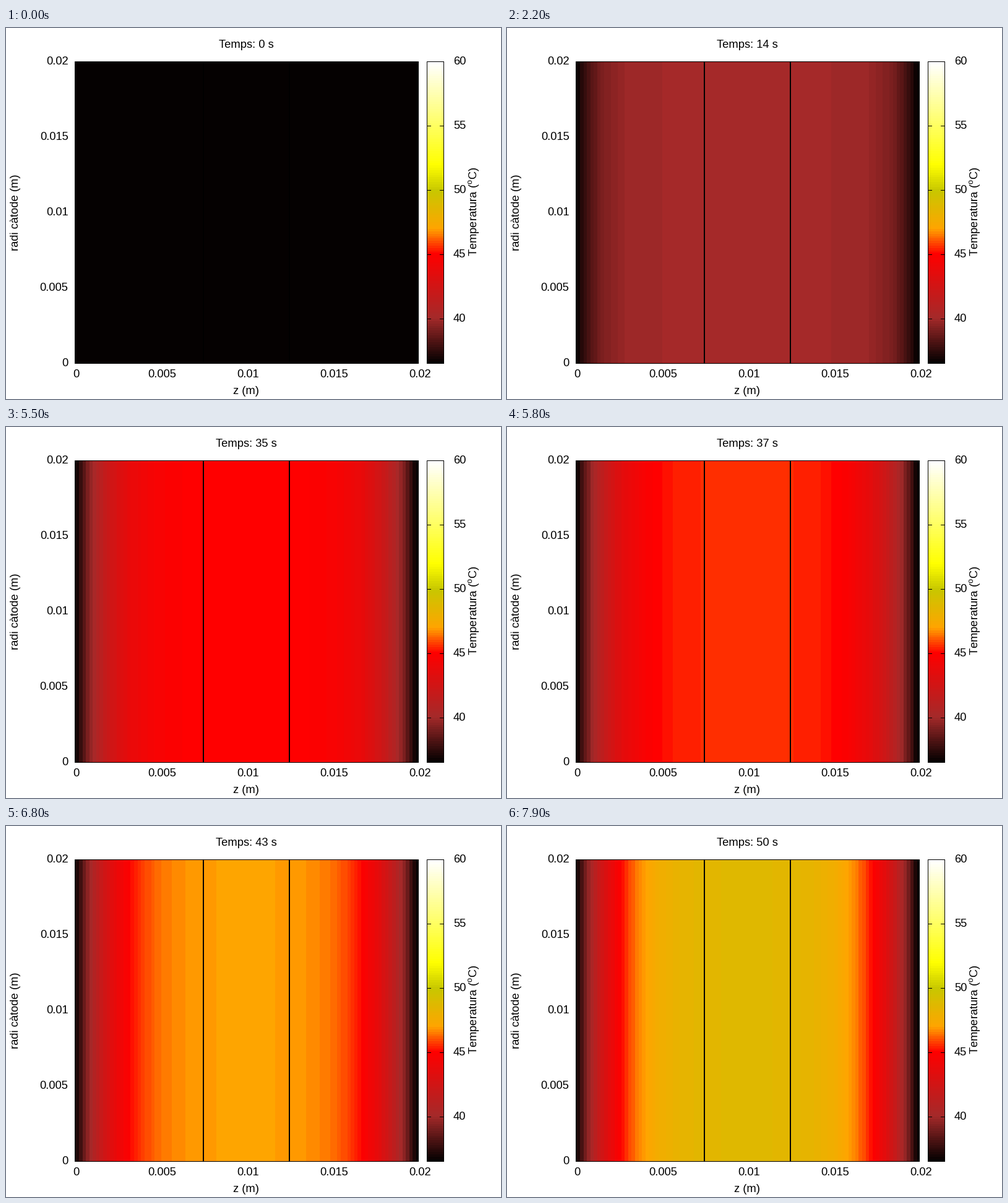
These frames come from a looping animation (800 px wide and 600 px high, 8000 ms). A matplotlib script:

```python
import math

import numpy as np
import matplotlib.pyplot as plt
from matplotlib.animation import FuncAnimation
from matplotlib.patches import Rectangle

plt.rcParams["font.family"] = "Liberation Sans"
plt.rcParams["font.size"] = 13.2

# Plot box in pixels
LEFT, RIGHT, TOP, BOTTOM = 111, 667, 54, 542
CELL0, CELL_W = 112.5, 5.56

# Palette: temperature and colour
T_MIN, T_MAX, LEVELS = 36.5, 60, 128
STOPS = [36.5, 40, 45, 47, 50, 52, 60]
COLORS = np.array([(5, 1, 1), (165, 42, 42), (255, 0, 0), (255, 165, 0),
                   (200, 200, 0), (255, 255, 0), (255, 255, 255)]) / 255

# Heated slab with both faces held at the starting temperature
T_START, HEATING, DIFFUSIVITY = 36.61, 0.242, 1.5e-7
DZ, DT, POINTS, SECONDS = 0.0002, 0.1, 100, 50

STEP = 1.59  # animation frames per simulated second


def level_color(level):
    level = np.clip(level, 0, LEVELS - 1)
    temp = T_MIN + level / (LEVELS - 1) * (T_MAX - T_MIN)
    return np.stack([np.interp(temp, STOPS, c) for c in COLORS.T], axis=-1)


def temp_color(temp):
    return level_color(np.floor((temp - T_MIN) / (T_MAX - T_MIN) * LEVELS))


def simulate():
    temp = np.full(POINTS, T_START)
    r = DIFFUSIVITY * DT / DZ ** 2
    history = [temp.copy()]
    for _ in range(SECONDS):
        for _ in range(round(1 / DT)):
            temp[1:-1] += r * np.diff(temp, 2) + HEATING * DT
        history.append(temp.copy())
    return history


history = simulate()
columns = np.floor((np.arange(LEFT, RIGHT) + 0.5 - CELL0) / CELL_W)
columns = np.clip(columns, 0, POINTS - 1).astype(int)


def heat_row(second):
    temp = history[second]
    cells = temp_color((temp[:-1] + temp[1:]) / 2)
    cells = np.vstack([cells, np.zeros(3)])  # last cell stays black
    return cells[columns][None]


fig = plt.figure(figsize=(8, 6), dpi=100, facecolor="white")
ax = fig.add_axes([0, 0, 1, 1])
ax.axis("off")


def picture(data, x0, y0, x1, y1):
    return ax.imshow(data, extent=(x0, x1, y1, y0), aspect="auto",
                     interpolation="nearest", zorder=1)


def bar(x, y, w, h):
    ax.add_patch(Rectangle((x, y), w, h, fc="black", lw=0,
                           antialiased=False, zorder=2))


def label(x, y, s, ha="center", rotation=0):
    return ax.text(x, y, s, ha=ha, va="baseline", rotation=rotation,
                   rotation_mode="anchor", color="black")


def frame(x0, x1):
    bar(x0, TOP, x1 - x0, 1)
    bar(x0, BOTTOM, x1 - x0, 1)
    bar(x0, TOP, 1, BOTTOM - TOP + 1)
    bar(x1 - 1, TOP, 1, BOTTOM - TOP + 1)


# Heat map
heat = picture(heat_row(0), LEFT, TOP, RIGHT, BOTTOM + 1)
frame(LEFT, RIGHT)
for x in (318, 457):
    bar(x, TOP, 2, BOTTOM - TOP + 1)

# Colour bar
rows = np.arange(TOP, BOTTOM + 1)
levels = np.floor((BOTTOM - rows) / (BOTTOM - TOP) * LEVELS)
picture(level_color(levels)[:, None], 680, TOP, 708, BOTTOM + 1)
frame(680, 708)
for i, temp in enumerate(range(60, 35, -5)):
    y = TOP + 104 * i
    bar(680, y, 7, 1)
    bar(701, y, 7, 1)
    label(723, y + 5, str(temp), ha="left")

# Axis labels
for i, tick in enumerate(["0", "0.005", "0.01", "0.015", "0.02"]):
    label(113 + 139 * i, 565, tick)
    label(100.5, 547 - 122 * i, tick, ha="right")
label(388, 592, "z (m)")
label(20, 298, "radi càtode (m)", rotation=90)
label(761, 297, r"Temperatura ($^{\mathregular{o}}$C)", rotation=90)
title = label(388, 32, "")

ax.set_xlim(0, 800)
ax.set_ylim(600, 0)


def update(n):
    second = math.ceil((n + 1) / STEP) - 1
    heat.set_data(heat_row(second))
    title.set_text(f"Temps: {second} s")
    return heat, title


anim = FuncAnimation(fig, update, frames=80, interval=100, repeat=True,
                     repeat_delay=0, blit=False)
plt.show()
```
